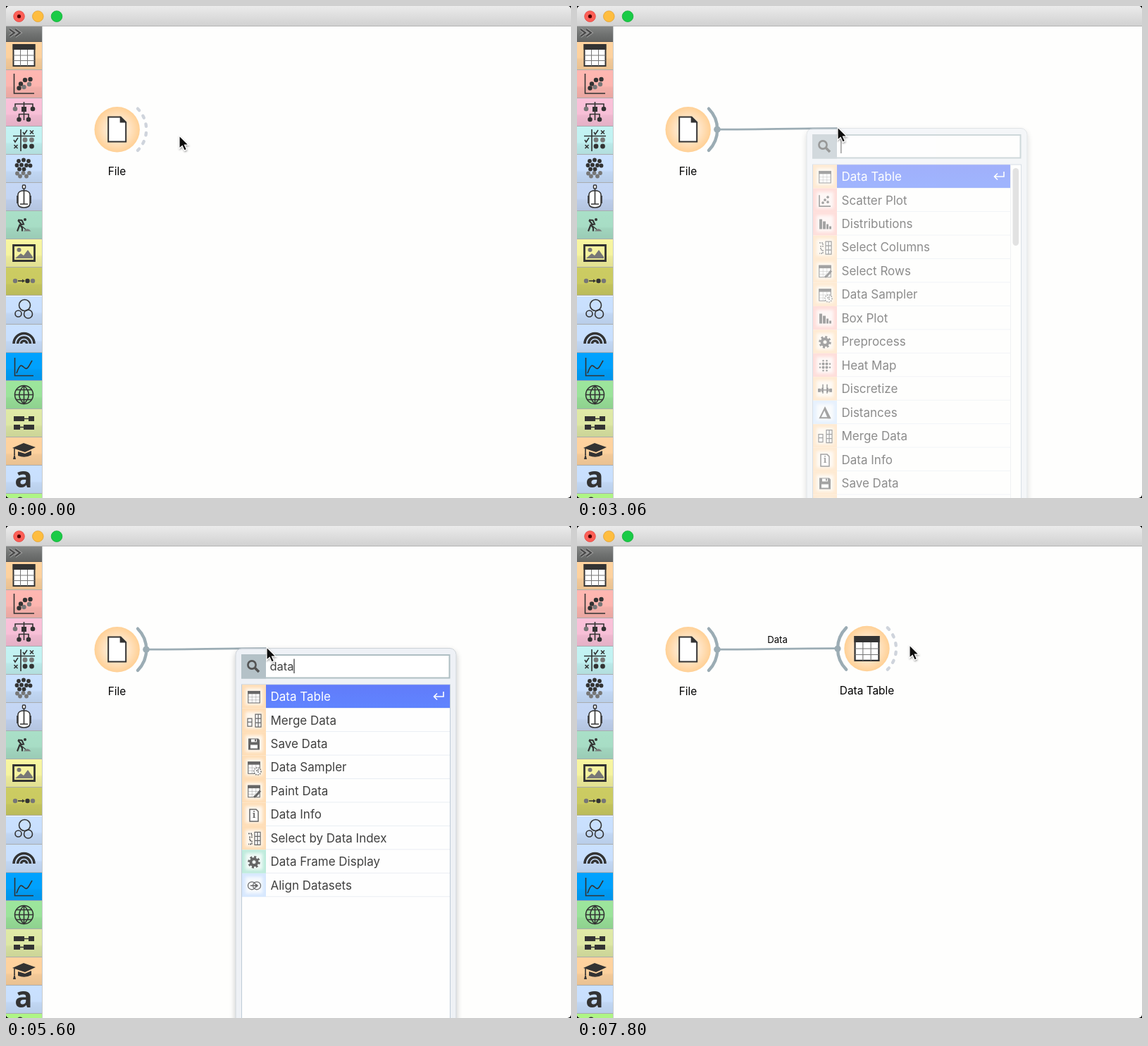
These frames come from a looping animation (802 px wide and 698 px high, 8500 ms). An HTML page:

```html
<!DOCTYPE html>
<html lang="en">
<head>
<meta charset="utf-8">
<title>Connecting widgets</title>
<style>
html, body { margin: 0; width: 100%; height: 100%; overflow: hidden; background: #000; }
svg { display: block; font-family: Inter, "Open Sans", sans-serif; }
.ln { fill: none; stroke: #333; stroke-width: 1.6; }
.w { fill: #fff; stroke: #333; stroke-width: 1.5; }
.k { fill: #333; }
.g { fill: #777; }
.arc { fill: none; stroke: #9bacb4; stroke-width: 4.4; stroke-linecap: round; }
.label { font-size: 15.4px; text-anchor: middle; }
.item { font-size: 17px; }
#query { font-size: 16.5px; }
</style>
</head>
<body>
<svg id="stage" width="802" height="698" viewBox="0 0 802 698"></svg>
<script>
const ORANGE = '#ffd39f', PINK = '#ffb7b1', BLUE = '#cae1ff', GREEN = '#a9e5d2', LIME = '#e2eeaa', SKY = '#00a2ff';
const PITCH = 33.45, TOP = 225.2;

const at = (x, y, body, s = 1) => `<g transform="translate(${x} ${y}) scale(${s})">${body}</g>`;
const path = (d, cls = 'ln', more = '') => `<path class="${cls}" d="${d}" ${more}/>`;
const dots = (cls, r, ...pts) => pts.map(([x, y]) => `<circle class="${cls}" cx="${x}" cy="${y}" r="${r}"/>`).join('');
const glyph = (s, size, more = '') => `<text class="k" y="${size * .35}" font-size="${size}" text-anchor="middle" ${more}>${s}</text>`;
const rect = (x, y, w, h, fill, more = '') => `<rect x="${x}" y="${y}" width="${w}" height="${h}" fill="${fill}" ${more}/>`;

// Icons centred on the origin
const table = path('M-15-15H15V15H-15z', 'w', 'style="stroke-width:2"')
  + path('M-5-8V15M5-8V15M-15 0H15M-15 7.5H15', 'ln', 'style="stroke:#777;stroke-width:1"')
  + path('M-16-16H16V-8H-16z', 'k');
const sheet = path('M-12.5-17.5H5L12.5-10V17.5H-12.5z', 'w', 'style="stroke-width:2"') + path('M4-18.5L13.5-9.5H4z', 'k');
const smallTable = at(0, 0, table, .55);
const grid = path('M1-9H9V9H1zM1-3H9M1 3H9M5-9V9', 'w', 'style="stroke-width:1.2"');

const icons = {
  table: smallTable,
  bars: path('M-8 7V-7H-4V7zM-3 7V-4H1V7zM2 7V0H5V7zM6 7V3H9V7z', 'k'),
  sampler: smallTable + '<circle class="w" cx="5" cy="5" r="5" stroke-dasharray="1.5 1.5"/>' + dots('g', 1.2, [4, 4], [6, 6], [6, 3]),
  delta: path('M0-7L7 7H-7z', 'ln', 'style="stroke-width:2"') + path('M0-8L8 8H4L-1-4z', 'k'),
  cluster: dots('g', 1.3, [-7, -7], [-3, -7], [1, -7], [5, -7], [-7, -3], [-7, 1], [-7, 5]) + dots('k', 2, [1, 1], [6, 1], [1, 6], [6, 6]),
  info: path('M-6-8H3L6-5V9H-6z', 'w') + glyph('i', 12, 'font-family="Noto Serif,serif" font-weight="700"'),
  discrete: path('M-10 1H10M-3-7V6M3-7V6', 'ln') + path('M-10-1H-6V4H-10zM6-1H10V4H6zM-5-2H-2V4H-5zM2-2H5V4H2z', 'k'),
  lens: path('M-3 3L-8 8', 'ln', 'style="stroke-width:3.5"') + '<circle class="w" cx="2" cy="-2" r="6.5"/>' + path('M-2-2H6M0-5L4 1', 'ln', 'style="stroke-width:1"'),
  gear: '<circle class="ln" r="4.5" style="stroke-width:4"/><circle class="ln" r="7.3" style="stroke-width:3;stroke-dasharray:2.9 2.83"/>',
  funnel: path('M-7-7H7L2 0V7L-2 5V0z'),
  matrix: dots('k', 2, [-2.5, -2.5], [2.5, -2.5], [-2.5, 2.5], [2.5, 2.5]) + dots('k', 1.2, [-2.5, -7], [2.5, -7], [-2.5, 7], [2.5, 7], [-7, -2.5], [-7, 2.5], [7, -2.5], [7, 2.5]),
  diff: glyph('∂t', 17, 'font-family="Noto Serif,serif" font-style="italic"'),
  bell: path('M-8 8H-6C-3 7-3-7 0-7S3 7 6 8H8'),
  text: path('M-9-8H9V4H-9z', 'g') + path('M-7-5H7M-7-2H7M-7 1H7', 'ln', 'style="stroke:#ddd;stroke-width:1"') + path('M-9 7H9'),
  merge: at(1, 0, grid) + path('M-9-3H-3V8H-9zM-9 2H-3', 'w', 'style="stroke-width:1.2"'),
  save: path('M-8-8H6L8-6V8H-8z', 'k') + path('M-4-7H4V-3H-4zM-5 1H5V6H-5z', '', 'fill="#fff"') + path('M1-7H3V-4H1z', 'k'),
  paint: smallTable + path('M9-1L3 6L0 8', 'ln', 'style="stroke-width:3"'),
  index: grid + path('M-8-7H-3V-2H-6V3H-3V8H-8', 'ln', 'stroke-dasharray="2 1"'),
  align: '<circle class="ln" cx="-3" r="5.5" style="stroke-width:1.2"/><circle class="ln" cx="4" r="5.5" style="stroke-width:1.2"/>' + path('M-5 0H5M3-2L5 0L3 2'),
  scatter: path('M-8-8V8H8') + dots('k', 1.8, [-3, 3], [0, -1], [4, -5], [4, 2])
};

const W = (name, icon, color = ORANGE) => ({ name, icon, color });
const dataTable = W('Data Table', 'table'), distributions = W('Distributions', 'bars', PINK),
  sampler = W('Data Sampler', 'sampler'), info = W('Data Info', 'info'), discretize = W('Discretize', 'discrete'),
  frame = W('Data Frame Display', 'gear', GREEN), merge = W('Merge Data', 'merge'), save = W('Save Data', 'save'),
  paint = W('Paint Data', 'paint'), byIndex = W('Select by Data Index', 'index'), align = W('Align Datasets', 'align', BLUE);
const partial = [dataTable, sampler, info, frame, merge, save, paint, byIndex, align];

const lists = {
  all: [dataTable, W('Scatter Plot', 'scatter', PINK), distributions, W('Select Columns', 'index'), W('Select Rows', 'paint'),
    sampler, W('Box Plot', 'bars', PINK), W('Preprocess', 'gear'), W('Heat Map', 'matrix', PINK), discretize,
    W('Distances', 'delta', BLUE), merge, info, save, paint],
  d: [dataTable, distributions, sampler, W('Distances', 'delta', BLUE), W('DBSCAN', 'cluster', BLUE), info, discretize,
    W('Developability', 'lens', BLUE), frame, W('Dropout Gene Selection', 'funnel', BLUE), W('Dot Matrix', 'matrix', BLUE),
    W('Difference', 'diff', SKY), W('Differential Expression', 'bell', LIME), W('Document Embedding', 'text', BLUE), W('Distance Matrix', 'matrix', BLUE)],
  da: [...partial, W('AdaBoost', 'cluster', PINK)],
  dat: partial,
  data: [dataTable, merge, save, sampler, paint, info, byIndex, frame, align]
};

function listView(key) {
  const rows = lists[key], long = rows.length > 14, right = long ? 615 : 630;
  let cells = '', whites = '', over = '';
  rows.forEach((row, i) => {
    const y = TOP + i * PITCH;
    cells += rect(335, y, 34, PITCH, row.color) + rect(369, y + PITCH - 1, right - 369, 1, '#e3e8f0');
    whites += `M340 ${y + 5}h24v23.5h-24z`;
    if (!i) over += rect(369, y, right - 369, PITCH - .6, 'url(#pick)');
    over += at(352, y + 17.5, icons[row.icon])
      + `<text class="item" x="375.5" y="${y + 22.9}" fill="${i ? '#000' : '#fff'}">${row.name}</text>`;
  });
  over += at(right - 16, 241, path('M7-6V1H-6M-2-3.5L-6.5 1L-2 5.5', 'ln', 'style="stroke:#fff"'));
  if (long) over += rect(615, 225, 1, 480, '#dfe3e8') + rect(618.5, 230, 8.5, key === 'all' ? 110 : 301, '#c1c1c1', 'rx="4.2"');
  return `<g id="list-${key}">${cells}<path d="${whites}" fill="#fff" opacity=".8" filter="url(#haze)"/>${over}</g>`;
}

// Left toolbar: colour and icon of every button
const check = (x, y) => path(`M${x - 3} ${y}l2 3l4-6`), cross = (x, y) => path(`M${x - 2.5} ${y - 2.5}l5 5m0-5l-5 5`);
const tools = [
  [ORANGE, at(25.5, 19, table)],
  [PINK, path('M11.5 5V33H40') + dots('g', 3.2, [33, 20], [25.5, 24]) + dots('k', 3.2, [27, 14], [34.5, 13], [21, 19.5], [18.5, 25.5])],
  ['#fac1d9', path('M25.5 5V31M13 15V8H38V15M18.5 30V22.5H32V30') + rect(22, 12, 7, 7, '#333') + dots('g', 3.3, [13, 15]) + dots('k', 3.3, [38, 15], [18.5, 30], [32, 30])],
  ['#c3f3f3', path('M21 4V35M10 13.5H41') + check(27, 8) + cross(36.5, 8) + check(14, 19) + cross(14, 28.5) + dots('g', 3.4, [27, 19], [36.5, 19]) + dots('k', 3.4, [27, 28], [36.5, 28])],
  [BLUE, dots('g', 2.9, [16, 26.5], [24.5, 26], [33, 26], [20, 30.5], [29, 30.5])
    + dots('k', 2.9, [18, 9], [25, 7.5], [32, 9], [15.5, 15], [22, 14.5], [29, 15], [34.5, 15.5], [19, 20.5], [25.5, 20.5])],
  ['#c5d7f5', path('M17 16Q18 11 25.5 11T34 16V30Q33 35 25.5 35T17 30z', 'w') + path('M25.5 7V30M20 30H31M16 18V29M35 18V29') + '<rect class="w" x="23.5" y="3" width="4" height="5" rx="1"/>'],
  ['#a9dfc7', dots('k', 2, [27, 12]) + path('M17 12.5L22.5 13L25 18.5L20 19.5L23 24V28.5M19.5 19.5L16 28.5M17 13L22 19', 'ln', 'style="stroke-width:2.1"') + path('M22 21L28 26', 'ln', 'style="stroke-width:1.1"') + path('M25 28.5Q30 22 35.5 28.5z', 'g')],
  ['#f7f5a0', path('M10.5 8.5H40.5V30.5H10.5z', 'ln', 'style="stroke-width:2.8"') + path('M13 27L21 20L25 23L31 15L38 25V27z', 'g') + dots('g', 3, [18.5, 15])],
  ['#cccc62', path('M17 19H25') + path('M23 16.5L27 19L23 21.5z', 'k') + dots('g', 3.2, [13, 19], [38, 19]) + dots('k', 3.2, [30.5, 19])],
  [BLUE, dots('ln', 8, [26.5, 12.5]) + dots('ln', 4.5, [17.5, 24.5]) + dots('ln', 6, [31.5, 25])],
  [BLUE, path('M11 27A14.5 14.5 0 0 1 40 27M16.5 27A9 9 0 0 1 34.5 27M21.5 27A4 4 0 0 1 29.5 27', 'ln', 'style="stroke-width:3.5"')],
  [SKY, path('M12.5 7V32.5H39') + path('M15 29C20 15 22 17 26 21S32 20 37 11')],
  ['#9ce59c', dots('ln', 13, [25.5, 19.5]) + path('M25.5 6.5V32.5M12.5 19.5H38.5M15 12.5H36M15 26.5H36M25.5 6.5Q12 19.5 25.5 32.5Q39 19.5 25.5 6.5')],
  ['#dfe9a6', path('M11 10H26V17H11zM32 10H40V17H32zM11 22H20V29H11zM25 22H40V29H25z', 'k') + path('M26 13.5H32M20 25.5H25')],
  [ORANGE, path('M9 15L25 8L42 14L27 21zM17 20L27 23L36 19V25Q27 30 17 26z', 'k') + path('M12 16V25', 'ln') + path('M12 23L14 31H10z', 'k')],
  [BLUE, '<text class="k" x="25" y="31" font-size="42" font-weight="700" text-anchor="middle" font-family="\'Noto Sans\',sans-serif">a</text>'],
  ['#aef585', dots('k', 4.5, [20, 9])]
].map(([color, icon], i) => at(0, Math.round(51 + 40.06 * i), rect(0, 0, 51, 40, color) + rect(0, 0, 51, 40, 'url(#shade)') + rect(0, 39, 51, 1, '#a9acae') + icon)).join('');

const side = (cx, cy, dir, id) => `<path id="${id}" class="arc" d="M${cx + dir * 29.8} ${cy - 29.6}A42 42 0 0 ${dir > 0 ? 1 : 0} ${cx + dir * 29.8} ${cy + 29.6}"/>`;
const stops = list => list.map(([o, c, a = 1]) => `<stop offset="${o}" stop-color="${c}" stop-opacity="${a}"/>`).join('');
const down = (id, ...s) => `<linearGradient id="${id}" x2="0" y2="1">${stops(s)}</linearGradient>`;
const radial = (id, ...s) => `<radialGradient id="${id}">${stops(s)}</radialGradient>`;
const chevrons = 'M5 33L12 38L5 43M13 33L20 38L13 43';

stage.innerHTML = `<defs>
${down('bar', [0, '#ebebeb'], [1, '#d1d1d1'])}${down('head', [0, '#858786'], [.5, '#717372'], [1, '#626463'])}
${down('shade', [0, '#000', 0], [.55, '#000', .01], [.62, '#000', .05], [1, '#000', .09])}${down('pick', [0, '#2b4ff8'], [1, '#2a5bff'])}
${radial('node', [0, '#fff3e4'], [.5, '#ffe6c9'], [1, '#ffd095'])}${radial('hot', [0, '#ffe9cf'], [.5, '#ffd8a6'], [1, '#ffb75c'])}
<filter id="soft"><feGaussianBlur stdDeviation="3"/></filter>
<filter id="haze"><feGaussianBlur stdDeviation="2"/></filter>
<filter id="drop" x="-10%" y="-10%" width="120%" height="120%"><feDropShadow dx="0" dy="4" stdDeviation="4" flood-opacity=".3"/></filter>
<filter id="tiny" x="-50%" y="-50%" width="200%" height="200%"><feDropShadow dx=".5" dy="1.5" stdDeviation="1.2" flood-opacity=".4"/></filter>
<clipPath id="window"><rect width="802" height="698" rx="5"/></clipPath></defs>
<g clip-path="url(#window)">
${rect(0, 0, 802, 698, '#fefefd')}${rect(0, 0, 802, 28, 'url(#bar)')}${rect(0, 28, 802, 1, '#b4b4b4')}
<g stroke-width=".8"><circle cx="18.5" cy="14.7" r="7.8" fill="#fd5f57" stroke="#e2463f"/><circle cx="18.5" cy="14.7" r="2.6" fill="#4d0000"/>
<circle cx="45.3" cy="14.7" r="7.8" fill="#febd3f" stroke="#e0a033"/><circle cx="72" cy="14.7" r="7.8" fill="#19cb46" stroke="#12ab35"/></g>
${rect(0, 29, 51, 21, 'url(#head)')}${rect(0, 50, 51, 1, '#555')}
${path(chevrons, 'ln', 'style="stroke:#a5a5a5;stroke-width:4"')}${path(chevrons, 'ln', 'style="stroke:#4a4a4a;stroke-width:2.2"')}
${tools}${rect(51, 29, 1, 669, '#c9cccd')}
<path id="link" fill="none" stroke="#9bacb4" stroke-width="2.8"/>
${side(157.2, 175.3, 1, 'out')}<circle id="ball" cx="199" cy="175.2" r="4.8" fill="#9bacb4"/>
<circle cx="157.7" cy="175.2" r="32.2" fill="url(#node)"/>${at(157.7, 175, sheet)}<text class="label" x="157.5" y="240">File</text>
<g id="target">
  <text x="284.5" y="166" font-size="13.2" text-anchor="middle">Data</text>
  ${side(412, 174, -1, 'in')}${side(411, 174, 1, 'free')}<circle cx="370" cy="174" r="4.6" fill="#9bacb4"/>
  <circle id="glow" cx="411.5" cy="174" r="33.5" fill="#4f9be0" filter="url(#soft)"/>
  <circle cx="411.5" cy="174" r="32.2" fill="url(#node)"/><circle id="warm" cx="411.5" cy="174" r="32.6" fill="url(#hot)"/>
  ${at(411.5, 174, table, 1.13)}
  ${rect(369, 221, 85.5, 23.5, '#acd3fd', 'id="mark" rx="4"')}<text class="label" x="411.5" y="239">Data Table</text>
</g>
<g id="popup">
  ${rect(326, 173.5, 313, 560, '#e9edf3', 'rx="9" stroke="#bcc3ca" filter="url(#drop)"')}
  ${rect(335, 183, 294.5, 32.5, '#fff', 'stroke="#94a9af" stroke-width="2"')}${rect(334, 182, 35, 34.5, '#9bacb4')}
  <circle cx="349" cy="197" r="5.6" fill="none" stroke="#1a1a1a" stroke-width="2.6"/><path d="M353 201L359 207" stroke="#1a1a1a" stroke-width="3.6"/>
  <text id="query" x="374.5" y="205"></text>${rect(0, 188.5, 1.3, 20.5, '#000', 'id="caret"')}
  ${rect(334.5, 225, 296, 500, '#fff', 'stroke="#a9bacb"')}${Object.keys(lists).map(listView).join('')}
</g>
<g id="cursor" filter="url(#tiny)"><path d="M0 0V18L4.2 14.3L7.2 21L10.4 19.6L7.4 13H13z" fill="#111" stroke="#fff" stroke-width="1.1"/></g>
</g>`;

const $ = id => document.getElementById(id);
const show = (id, on) => $(id).style.display = on ? '' : 'none';
const clamp = v => Math.max(0, Math.min(1, v));

// Pointer path: time, x, y
const route = [[0, 246, 184], [200, 246, 184], [300, 240, 183], [400, 237, 183], [600, 237, 183], [720, 217, 179], [830, 199, 176],
  [1900, 199, 176], [2030, 203, 178], [2130, 215, 181], [2230, 248, 183], [2300, 308, 182], [2330, 341, 180],
  [2400, 359, 176], [2500, 367, 173], [2630, 370, 172], [6900, 370, 172], [7000, 378, 171], [7200, 420, 168],
  [7400, 455, 167], [7650, 472, 169], [8500, 472, 169]];
function pointer(t) {
  const i = route.findIndex(p => p[0] > t), a = route[i - 1], b = route[i], k = (t - a[0]) / (b[0] - a[0]);
  return [a[1] + (b[1] - a[1]) * k, a[2] + (b[2] - a[2]) * k];
}
const tint = k => `rgb(${[[207, 155], [212, 172], [220, 180]].map(([a, b]) => Math.round(a + (b - a) * k))})`;
const dashes = (el, k) => el.style.strokeDasharray = k < 1 ? `${3.3 + 9.2 * k} ${9.2 * (1 - k)}` : 'none';

function draw() {
  const t = performance.now() % 8500;
  const ramp = (a, b) => clamp((t - a) / (b - a));
  const [x, y] = pointer(t);
  $('cursor').setAttribute('transform', `translate(${x} ${y})`);

  $('out').style.stroke = tint(ramp(720, 830));
  dashes($('out'), ramp(1920, 2040));
  const linked = t >= 1930;
  show('ball', linked);
  show('link', linked);
  if (linked) {
    const [ex, ey] = t < 2700 ? pointer(t - 30) : [370, 172], ly = ey + 1.6, mid = (199 + ex) / 2;
    $('link').setAttribute('d', `M199 175.2C${mid} 175.2 ${mid} ${ly} ${ex} ${ly}`);
  }

  const fade = ramp(3030, 3100) * (1 - ramp(5550, 5750));
  show('popup', fade > 0);
  $('popup').style.opacity = fade;
  $('query').textContent = 'data'.slice(0, [3900, 4060, 4160, 4360].filter(k => t >= k).length);
  $('caret').setAttribute('x', 374.2 + $('query').getComputedTextLength());
  show('caret', !(t >= 3500 && t < 3900 || t >= 4900 && t < 5360));
  const current = Object.keys(lists)[[3940, 4100, 4200, 4400].filter(k => t >= k).length];
  for (const key in lists) show('list-' + key, key === current);

  show('target', t >= 5740);
  $('target').style.opacity = ramp(5730, 5800);
  const chosen = ramp(5760, 5950) * (1 - ramp(7690, 7800));
  $('glow').style.opacity = chosen * .75;
  $('warm').style.opacity = chosen;
  show('mark', t < 7740);
  $('free').style.stroke = tint(t > 6900 ? clamp(1 - Math.abs(x - 450) / 20) : 0);
  dashes($('free'), 0);
  requestAnimationFrame(draw);
}
draw();
</script>
</body>
</html>
```
